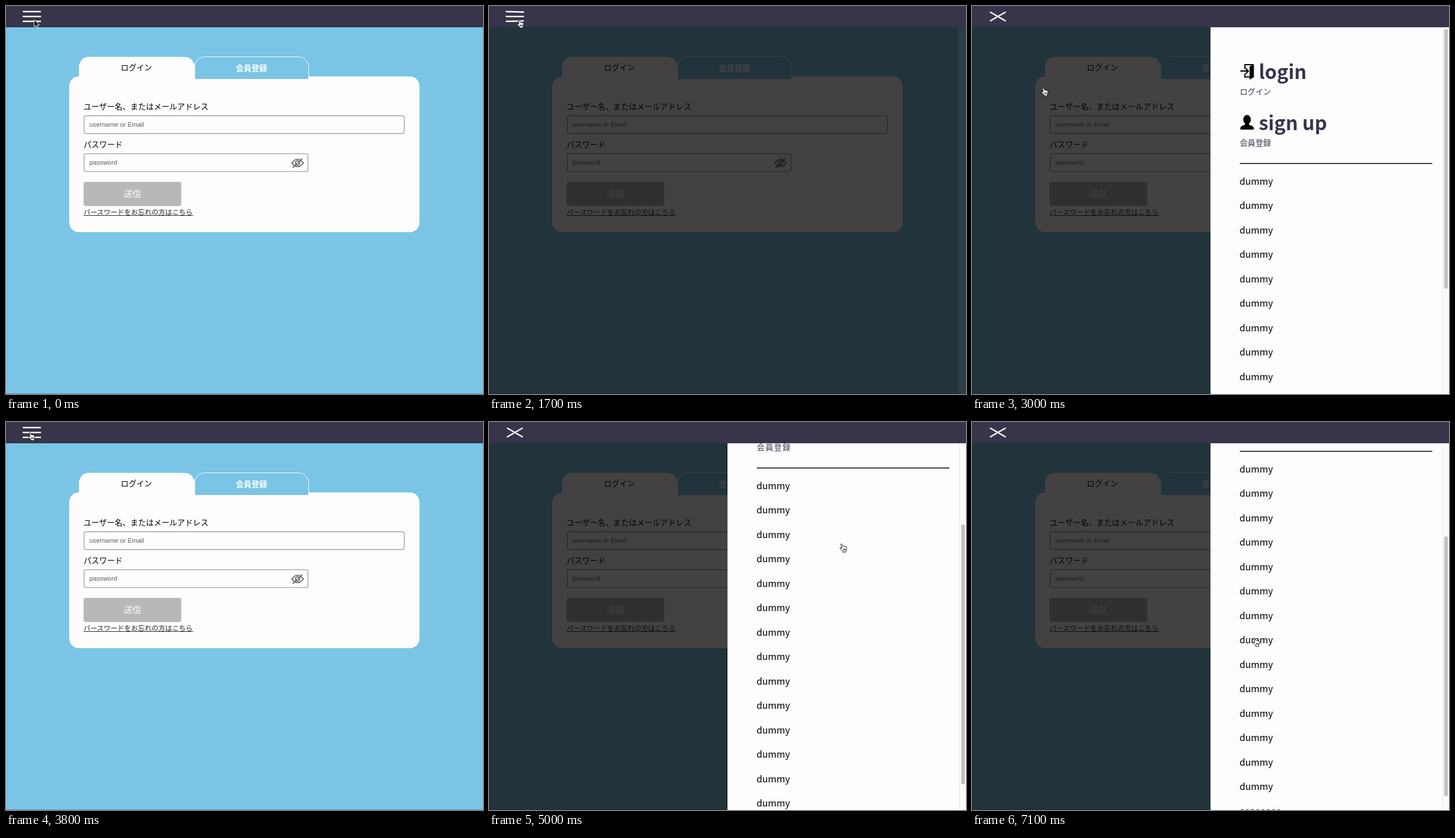
These frames come from a looping animation (830 by 675 pixels, 7200 ms). An HTML page:

```html
<!DOCTYPE html>
<html lang="ja">
<head>
<meta charset="utf-8">
<title>Login menu</title>
<style>
html, body { margin: 0; width: 100%; height: 100%; overflow: hidden; background: #7ac4e5; }
svg { display: block; width: 830px; height: 675px; }
text { font: 500 13.6px "Noto Sans CJK JP", "Noto Sans CJK", sans-serif; }
.mid { text-anchor: middle; }
.strong { font-weight: 700; }
.send { font-size: 15.3px; }
.hint { font: 11.33px "Liberation Sans", Arial, sans-serif; fill: #5c5c5c; }
.field { fill: #fdfdfd; stroke: #b0b0b0; stroke-width: 1.7; }
.link { font-size: 11.9px; font-weight: 400; fill: #222; }
.title { font-size: 33.5px; font-weight: 700; fill: #38344a; }
.sub { font-weight: 400; fill: #38344a; }
.item { font-size: 16.2px; }
.bar { fill: #fff; }
</style>
</head>
<body>
<svg viewBox="0 0 830 675">
  <defs><clipPath id="port"><rect x="415" y="37" width="415" height="638"/></clipPath></defs>
  <rect width="830" height="675" fill="#7ac4e5"/>
  <rect y="674" width="830" height="1" fill="#38344a" opacity=".35"/>

  <!-- login form -->
  <rect x="110" y="122.5" width="609.5" height="271" rx="17" fill="#fdfdfd"/>
  <path d="M127 127V105.5a17 17 0 0 1 17-17H311a17 17 0 0 1 17 17V127Z" fill="#fdfdfd"/>
  <path d="M328.5 127V105.5a17 17 0 0 1 17-17H509.5a17 17 0 0 1 17 17V127" fill="#7ac4e5" stroke="#fdfdfd"/>
  <text class="mid" x="227" y="112.3">ログイン</text>
  <text class="mid strong" x="427.2" y="112.6" fill="#fdfdfd">会員登録</text>
  <text x="135" y="179.7">ユーザー名、またはメールアドレス</text>
  <rect class="field" x="136" y="190.8" width="557" height="31" rx="3.2"/>
  <text class="hint" x="145" y="210">username or Email</text>
  <text x="135" y="245.9">パスワード</text>
  <rect class="field" x="136" y="257" width="389.3" height="31" rx="3.2"/>
  <text class="hint" x="145" y="276.3">password</text>
  <g fill="none" stroke="#555" stroke-width="1.6">
    <path d="M497.4 273Q507.3 260 517.4 273Q507.3 286 497.4 273ZM499 281.4L516 265"/>
    <circle cx="507.4" cy="273" r="3.7"/>
  </g>
  <rect x="135" y="306" width="170" height="42" rx="4" fill="#b8b8b8"/>
  <text class="mid send" x="220" y="332.3" fill="#fdfdfd">送信</text>
  <text class="link" x="135" y="362.6">パースワードをお忘れの方はこちら</text>
  <path d="M135 364.5H325.5" stroke="#222"/>

  <rect id="shade" width="830" height="675" fill="#040101" opacity=".74"/>

  <g id="drawer">
    <rect x="415" y="37" width="415" height="638" fill="#fdfdfd"/>
    <g clip-path="url(#port)">
      <g id="list">
        <path d="M474.8 109V102H489M474.8 118V123.5H484M467 113.2H480M476 108.4L480.8 113.2L476 118" fill="none" stroke="#000" stroke-width="2.2"/>
        <path d="M490.5 101V124L483 128V105Z"/>
        <text class="title" x="499" y="127">login</text>
        <text class="sub" x="466" y="154.3">ログイン</text>
        <ellipse cx="478.6" cy="197.6" rx="6.6" ry="8"/>
        <path d="M467 215V211.5Q467.5 209 475 206.5V202H482V206.5Q489.7 209 490.2 211.5V215Z"/>
        <text class="title" x="499" y="215.5">sign up</text>
        <text class="sub" id="join" x="466" y="243">会員登録</text>
        <path d="M466 274H801" stroke="#000" stroke-width="1.3"/>
      </g>
      <rect x="818" y="37" width="12" height="638" fill="#fafafa"/>
      <path d="M818.5 37V675" stroke="#e8e8e8"/>
      <rect id="thumb" x="821.5" y="40" width="6.7" height="452" rx="3.3" fill="#c1c1c1"/>
    </g>
  </g>

  <rect width="830" height="37" fill="#38344a"/>
  <rect class="bar" x="29" y="8.5" width="32" height="2.5" rx="1"/>
  <rect class="bar" x="29" y="17" width="32" height="2.5" rx="1"/>
  <rect class="bar" x="29" y="25.5" width="32" height="2.5" rx="1"/>

  <g id="cursor">
    <path id="arrow" d="M1 1V13.2L4 10.6 6 15 8.2 14 6.3 9.8H10Z" fill="#000" stroke="#fff"/>
    <path id="hand" d="M2.2 1.4Q3.6 .3 4.5 1.8L5.8 5Q7.2 4.4 8 5.4Q9.3 4.8 10 5.9Q11.8 5.5 12 7.4V10.5Q12 12 11 13.2V15.3H5.8V14Q3.5 12 1 9Q.4 7.4 2 7.4L4 8.6ZM6.5 9.5V12.5M8.2 9.5V12.5M9.9 9.5V12.5" fill="#fff" stroke="#000" stroke-width=".9"/>
  </g>
</svg>
<script>
const LOOP = 7200, TICK = 100;
const OPEN = 1685, CLOSE = 3185, REOPEN = 3868;
const SLIDE = 300, CROSS = 220;
const $ = id => document.getElementById(id);
const set = (el, attrs) => Object.entries(attrs).forEach(([k, v]) => el.setAttribute(k, v));
const show = (el, on) => { el.style.display = on ? '' : 'none'; };
const bars = document.querySelectorAll('.bar');

for (let i = 0; i < 15; i++) {
  const row = document.createElementNS('http://www.w3.org/2000/svg', 'text');
  set(row, { class: 'item', x: 465.5, y: 310.8 + i * 42.5 });
  row.textContent = i < 14 ? 'dummy' : 'aaaaaaaa';
  $('list').append(row);
}

// each move: start, end, destination
const moves = [
  [300, 500, [72, 67]], [500, 800, [41, 11]],
  [1000, 1300, [56, 2]], [1400, 1700, [48, 23]],
  [2500, 2800, [531, 195]], [2800, 3000, [120, 141]],
  [3200, 3800, [38, 17]], [3900, 4100, [557, 176]], [4100, 4700, [610, 211]],
  [5900, 6400, [480, 540]], [6400, 6700, [192, 370]], [6700, 7100, [488, 375]]
];
const scrolls = [[4700, 5000, [194]], [5100, 5300, [254]], [5500, 5800, [223]]];

const clamp = x => Math.min(1, Math.max(0, x));
const smooth = x => x * x * (3 - 2 * x);

function glide(from, legs, t) {
  return legs.reduce((pos, [t0, t1, to]) => {
    const k = smooth(clamp((t - t0) / (t1 - t0)));
    return pos.map((v, i) => v + (to[i] - v) * k);
  }, from);
}

// cubic-bezier(.25, .1, .25, 1)
function ease(x) {
  if (x <= 0 || x >= 1) return clamp(x);
  let lo = 0, hi = 1, s, r;
  for (let i = 0; i < 20; i++) {
    s = (lo + hi) / 2;
    r = 1 - s;
    if (.75 * r * s + s * s * s < x) lo = s; else hi = s;
  }
  return .3 * r * r * s + 3 * r * s * s + s * s * s;
}

function openness(t, span) {
  const part = t0 => ease((t - t0) / span);
  return part(OPEN) - part(CLOSE) + part(REOPEN);
}

function draw(t) {
  const slide = openness(t, SLIDE), cross = openness(t, CROSS);
  show($('shade'), (t > OPEN && t < CLOSE) || t > REOPEN);
  set($('drawer'), { transform: `translate(${415 * (1 - slide)})`, opacity: cross });

  [1, 0, -1].forEach((dir, i) => set(bars[i], {
    transform: `translate(0 ${8.5 * dir * cross}) rotate(${30 * dir * cross} 45 ${9.75 + 8.5 * i})`,
    opacity: dir ? 1 : 1 - cross
  }));

  const [y] = glide([0], scrolls, t);
  set($('list'), { transform: `translate(0 ${-y})` });
  set($('thumb'), { y: 40 + y * .713 });
  $('join').style.letterSpacing = t > 4200 ? '1.3px' : '0';

  const hand = (t >= 700 && t < CLOSE) || t >= 3600;
  show($('hand'), hand);
  show($('arrow'), !hand);
  set($('cursor'), { transform: `translate(${glide([48, 23], moves, t)})` });
}

const start = performance.now();
function frame() {
  const t = (performance.now() - start) % LOOP;
  draw(Math.floor(t / TICK) * TICK);
  requestAnimationFrame(frame);
}
draw(0);
requestAnimationFrame(frame);
</script>
</body>
</html>
```
